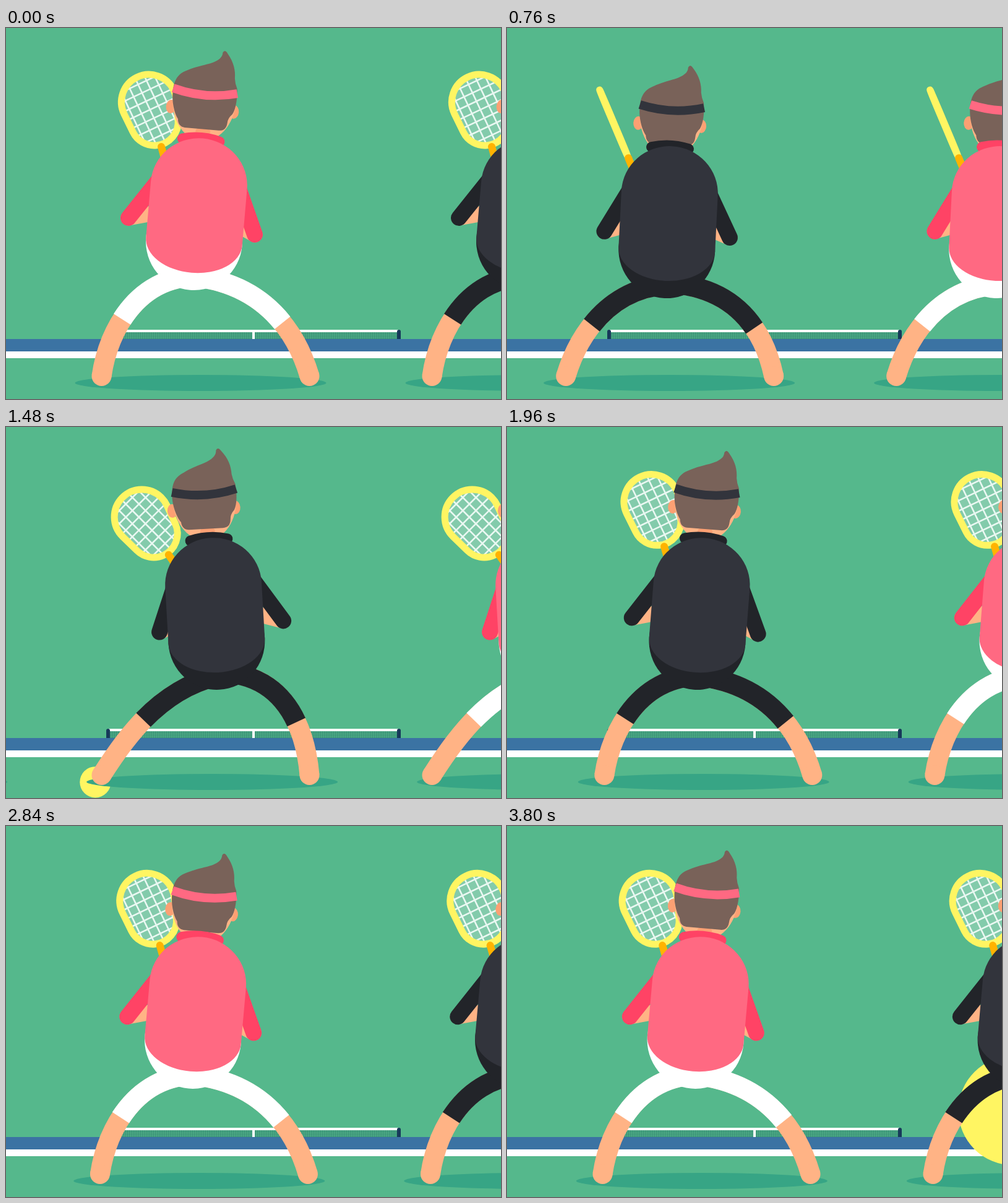
Animation, 800 px wide and 600 px high, one loop 3.84 s. Source, as an HTML page with a canvas:

```html
<!DOCTYPE html>
<html lang="en">
<head>
<meta charset="utf-8">
<title>Tennis warm-up</title>
<style>
  html, body { margin: 0; width: 100%; height: 100%; overflow: hidden; background: #55b88c; }
  canvas { display: block; width: 800px; height: 600px; }
</style>
</head>
<body>
<canvas id="stage" width="800" height="600"></canvas>
<script>
const ctx = document.getElementById('stage').getContext('2d');
const { PI, sin, cos } = Math;
const HALF = 1920, SWAY = 960, GAP = 534;
const SKIN = '#ffb385', SKIN_DARK = '#fca073', HAIR = '#796259', YELLOW = '#fff562';
const PINK = { shirt: '#ff6982', sleeve: '#ff4365', shorts: '#ffffff' };
const BLACK = { shirt: '#32343c', sleeve: '#222429', shorts: '#222429' };

const wave = ms => 2 * PI * ms / SWAY;
const mix = (a, b, t) => [a[0] + (b[0] - a[0]) * t, a[1] + (b[1] - a[1]) * t];

function ease(p) {
  p = Math.min(1, Math.max(0, p));
  return p * p * (3 - 2 * p);
}

function rect(color, x, y, w, h) {
  ctx.fillStyle = color;
  ctx.fillRect(x, y, w, h);
}

function ellipse(color, x, y, rx, ry, end = 2 * PI) {
  ctx.fillStyle = color;
  ctx.beginPath();
  ctx.ellipse(x, y, rx, ry, 0, 0, end);
  ctx.fill();
}

// Strokes a line, quadratic or cubic, depending on the number of points
function stroke(color, width, points, cap = 'round') {
  const [start, ...rest] = points;
  const flat = rest.flat();
  ctx.strokeStyle = color;
  ctx.lineWidth = width;
  ctx.lineCap = cap;
  ctx.beginPath();
  ctx.moveTo(...start);
  if (rest.length === 1) ctx.lineTo(...flat);
  else if (rest.length === 2) ctx.quadraticCurveTo(...flat);
  else ctx.bezierCurveTo(...flat);
  ctx.stroke();
}

function placed(x, y, angle, draw) {
  ctx.save();
  ctx.translate(x, y);
  ctx.rotate(angle);
  draw();
  ctx.restore();
}

// Part of a cubic from t to its end
function curveTail([a, b, c, d], t) {
  const ab = mix(a, b, t), bc = mix(b, c, t), cd = mix(c, d, t);
  const abc = mix(ab, bc, t), bcd = mix(bc, cd, t);
  return [mix(abc, bcd, t), bcd, cd, d];
}

function court() {
  rect('#55b88c', 0, 0, 800, 600);
  rect('rgba(35,110,100,.12)', 165, 492, 470, 11);
  for (let x = 166; x < 635; x += 3) rect('rgba(30,100,95,.35)', x, 492, 1, 11);
  for (let y = 493; y < 503; y += 3) rect('rgba(30,100,95,.35)', 165, y, 470, 1);
  rect('#3b73a3', 0, 503, 800, 20);
  rect('#ffffff', 0, 523, 800, 11);
  rect('#ffffff', 165, 488, 470, 4);
  rect('#ffffff', 398, 491, 4, 12);
  for (const x of [165, 635]) {
    stroke('#17395a', 6, [[x, 491], [x, 500]]);
    rect('#17395a', x - 3, 497, 6, 6);
  }
}

function ball(phase) {
  const t = phase - 1420;
  if (t < 0) return;
  const r = 24 + 0.000303 * t * t;
  ellipse(YELLOW, 132.4 + 0.003226 * t * t, 622 - 0.848 * t + 0.001078 * t * t, r, r);
}

const racketRim = new Path2D();
racketRim.arc(0, -75, 44.5, PI - 0.183, 2 * PI + 0.183);
racketRim.arc(0, -42, 38.5, 0.183, PI - 0.183);
racketRim.closePath();

function racket(turn) {
  const rim = new Path2D();
  rim.addPath(racketRim, new DOMMatrix([turn, 0, 0, 1, 0, 0]));
  ctx.fillStyle = 'rgba(255,255,255,.27)';
  ctx.fill(rim);

  ctx.save();
  ctx.clip(rim);
  ctx.scale(turn, 1);
  ctx.rotate(-0.17);
  ctx.beginPath();
  for (let i = -4; i <= 4; i++) {
    ctx.moveTo(i * 15 + 9, -130);
    ctx.lineTo(i * 15 + 9, 10);
    ctx.moveTo(-60, i * 15 - 62);
    ctx.lineTo(70, i * 15 - 62);
  }
  ctx.strokeStyle = '#eaf8f2';
  ctx.lineWidth = 2.6;
  ctx.stroke();
  ctx.restore();

  ctx.strokeStyle = YELLOW;
  ctx.lineWidth = 11;
  ctx.stroke(rim);
  stroke('#ffb300', 12, [[0, 0], [0, 50]]);
}

function head(kit) {
  ellipse(SKIN_DARK, -53, 27, 8, 11);
  ellipse(SKIN_DARK, 49, 27, 8, 11);
  ellipse(SKIN, 0, 12, 51, 66, PI);
  ellipse(SKIN_DARK, 2, 63, 12, 7);
  ctx.fillStyle = HAIR;
  ctx.beginPath();
  ctx.moveTo(-52, 0);
  ctx.bezierCurveTo(-51, -20, -44, -28, -31, -34);
  ctx.bezierCurveTo(-8, -46, 8, -46, 19, -57);
  ctx.quadraticCurveTo(23, -61, 23, -67);
  ctx.quadraticCurveTo(26, -73, 31, -66);
  ctx.bezierCurveTo(42, -53, 46, -40, 46, -27);
  ctx.quadraticCurveTo(47, -19, 51, -11);
  ctx.bezierCurveTo(53, 5, 52, 22, 47, 31);
  ctx.quadraticCurveTo(40, 38, 40, 46);
  ctx.quadraticCurveTo(39, 59, 27, 59);
  ctx.lineTo(-28, 59);
  ctx.quadraticCurveTo(-39, 58, -40, 46);
  ctx.bezierCurveTo(-47, 37, -53, 18, -52, 0);
  ctx.fill();
  stroke(kit.shirt, 14, [[-52, -3], [0, 11], [52, -3]], 'butt');
}

function leg(kit, points, knee) {
  stroke(SKIN, 32, points, 'butt');
  ellipse(SKIN, ...points[0], 16, 16);
  stroke(kit.shorts, 32.5, curveTail(points, knee), 'butt');
}

function legs(kit, x, hipX, hipY, pose) {
  const { sway: s, crouch: c } = pose, y = 563;
  const l = x - 168, r = x + 168;
  leg(kit, [[l, y], [l + 25.5 + 14.5 * s, y - 70 + 8 * s],
    [l + 78 + 17 * s, y - 149 + 10.5 * s + 0.8 * c], [hipX, hipY]], 0.44 + 0.03 * s - 0.002 * c);
  leg(kit, [[r, y], [r - 13 + 7 * s, y - 70.5 - 2.5 * s],
    [r - 54 + 16 * s, y - 158 - 10 * s + 0.8 * c], [hipX, hipY - 3 - 3 * s]], 0.4 - 0.02 * s - 0.002 * c);
}

function player(x, kit, pose) {
  const { sway: s, crouch, lean, nod, turn } = pose;
  const px = x + 18.5 * s, py = 345 + crouch;
  const onBody = (lx, ly) => [px + lx * cos(lean) - ly * sin(lean), py + lx * sin(lean) + ly * cos(lean)];

  placed(px - 65.5 - 12.5 * s, py - 146 + 7 * s, (-25.5 - 10 * s) * PI / 180, () => racket(turn));

  const elbows = [[px - 99 + 7 * s, py - 26 + 12 * s], [px + 103 + 5 * s, py - 22 - 11 * s]];
  elbows.forEach(elbow => stroke(SKIN, 25, [elbow, onBody(5, -60)]));
  elbows.forEach((elbow, i) => stroke(kit.sleeve, 26, [elbow, onBody(i ? 58 : -58, -105)]));

  const [hx, hy] = onBody(-5 + 23 * lean, -241);
  placed(hx, hy + nod, lean, () => head(kit));

  legs(kit, x, px, py + 57, pose);
  placed(px, py, lean, () => {
    stroke(kit.sleeve, 17, [[-33, -164], [-3, -172], [27, -164]]);
    ellipse(kit.shorts, 0, 0, 78, 79);
    ctx.fillStyle = kit.shirt;
    ctx.beginPath();
    ctx.ellipse(0, -91, 78, 76, 0, PI, 2 * PI);
    ctx.ellipse(0, 0, 78, 51, 0, 0, PI);
    ctx.fill();
  });
}

function draw(now) {
  const time = now % (2 * HALF), phase = time % HALF, half = Math.floor(time / HALF);
  const lag = 80 * sin(PI * phase / HALF);
  const pose = {
    sway: -cos(wave(phase)),
    crouch: 14 * sin(wave(phase)) ** 2,
    nod: 13 * sin(wave(phase - lag)) ** 2,
    lean: (0.6 + 4.5 * cos(wave(phase + 40))) * PI / 180,
    turn: Math.max(0.01, Math.abs(cos(PI * ease((phase - 560) / 400))))
  };
  const lead = 322.5 + GAP * ease(phase / SWAY);
  const row = [-2, -1, 0, 1].map(k => ({ x: lead + GAP * k, kit: (k + half) % 2 ? BLACK : PINK }));

  court();
  ball(phase);
  row.forEach(({ x }) => ellipse('#37a585', x + 1.5 + 9.5 * pose.sway, 574, 203, 13));
  row.forEach(({ x, kit }) => player(x, kit, pose));
  requestAnimationFrame(draw);
}
requestAnimationFrame(draw);
</script>
</body>
</html>
```
